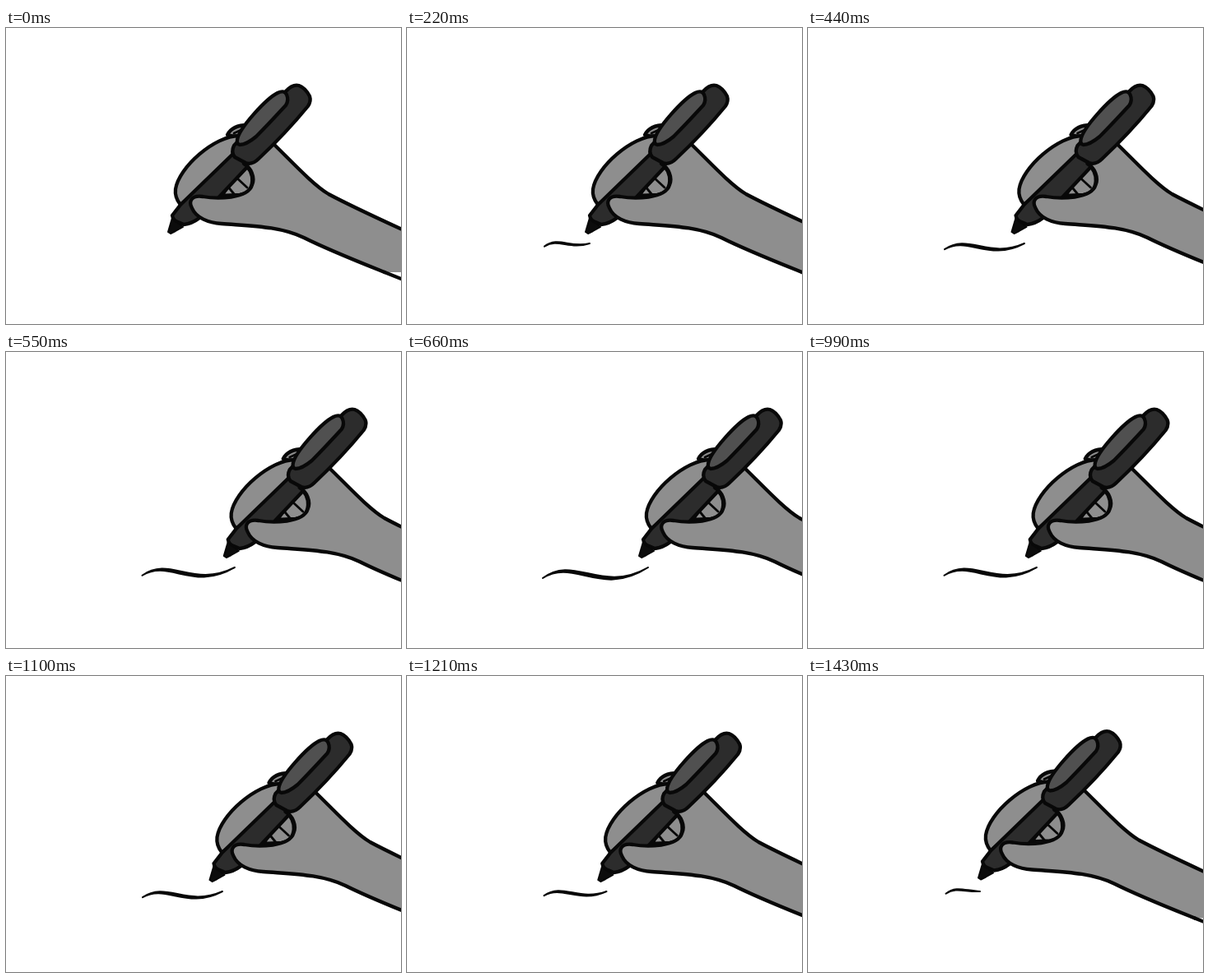
Animation of 480x360 px, one loop 1540 ms. Source, as an HTML page:

```html
<!DOCTYPE html>
<html lang="en">
<head>
<meta charset="utf-8">
<title>Writing hand</title>
<style>
  html, body { margin: 0; height: 100%; overflow: hidden; background: #fff; }
  svg { display: block; width: 100vw; height: 100vh; }
  path { stroke: #080808; stroke-width: 4.3; stroke-linejoin: round; stroke-linecap: round; }
  .skin { fill: #8e8e8e; }
  .pen { fill: #2c2c2c; }
  .clip { fill: #505050; }
  .nib { fill: #0c0c0c; stroke-width: 2; }
  .line { fill: none; }
  .fine { stroke-width: 2.8; }
  #trail { fill: #080808; stroke-width: 2; }
</style>
</head>
<body>
<svg viewBox="0 0 480 360">
  <path id="trail"/>
  <g id="hand">
    <!-- fingers behind the pen -->
    <path class="skin" d="M269 130C273 122 282 118 294 118L288 134Z"/>
    <path class="line fine" d="M277 128L290 122"/>
    <path class="skin" d="M283 131C254 131 210 169 206 196C205 204 208 210 212 215L285 155Z"/>
    <path class="skin" d="M289 165C303 174 304 200 284 203L262 204Z"/>
    <path class="line fine" d="M279 181L293 194M269 192L278 203"/>
    <!-- pen barrel and nib -->
    <path class="nib" d="M202 231L197 248L200 250L206 247L215 242Z"/>
    <path class="pen" d="M277 152L212 215L202 228Q203 234 209 236L216 239Q226 238 235 231L296 166Z"/>
    <!-- arm, palm and thumb -->
    <path class="skin" d="M490 297V249C455 233 420 217 392 202C372 190 345 160 322 138L289 165C298 170 303 182 299 191C294 208 256 208 239 205C224 203 222 212 226 219C231 231 246 237 262 238C300 241 332 241 362 255C392 270 425 283 460 297"/>
    <path class="line" d="M460 297L490 309"/>
    <!-- cap -->
    <path class="pen" d="M340 77Q348 68 356 70Q364 73 369 83Q371 89 367 95Q340 128 307 159Q299 167 291 164L278 157Q273 151 277 143Z"/>
    <path class="clip" d="M281 136C283 122 316 86 330 79Q338 75 341 81Q344 88 340 94C327 108 318 118 304 132Q292 142 284 142Q280 141 281 136Z"/>
  </g>
</svg>
<script>
const STEP = 110, STEPS = 14;
const hand = document.getElementById('hand');
const trail = document.getElementById('trail');

// Key positions, two poses apart
const handKeys = [0, 20, 50.5, 85];
const inkEndKeys = [196, 222, 263, 293];

// Linear between keys, continuing the last slope past the end
function between(keys, pose) {
  const i = Math.min(Math.floor(pose / 2), keys.length - 2);
  return keys[i] + (keys[i + 1] - keys[i]) * (pose / 2 - i);
}

// A closed lens around an S curve that grows longer, deeper and bolder
function inkPath(pose) {
  if (!pose) return '';
  const x = 168 - pose / 2, y = 264.5 + 0.29 * pose ** 2;
  const endX = between(inkEndKeys, pose), endY = 262;
  const crestX = x + 0.3 * (endX - x), crestY = 257 - 1.5 * pose;
  const dipX = x + 0.55 * (endX - x), dipY = 255 + 7 * pose;
  const w = 0.6 + 0.3 * pose;
  return `M${x} ${y}C${crestX} ${crestY - w} ${dipX} ${dipY - w} ${endX} ${endY}` +
         `C${dipX} ${dipY + w} ${crestX} ${crestY + w} ${x} ${y}Z`;
}

const start = performance.now();
function draw() {
  const step = Math.floor((performance.now() - start) / STEP) % STEPS;
  const pose = Math.min(step, STEPS - step);   // forward, then back
  const lift = pose === 1 ? -2.5 : 0;          // small hop as the stroke begins
  hand.setAttribute('transform', `translate(${between(handKeys, pose)} ${lift})`);
  trail.setAttribute('d', inkPath(pose));
  requestAnimationFrame(draw);
}
draw();
</script>
</body>
</html>
```
